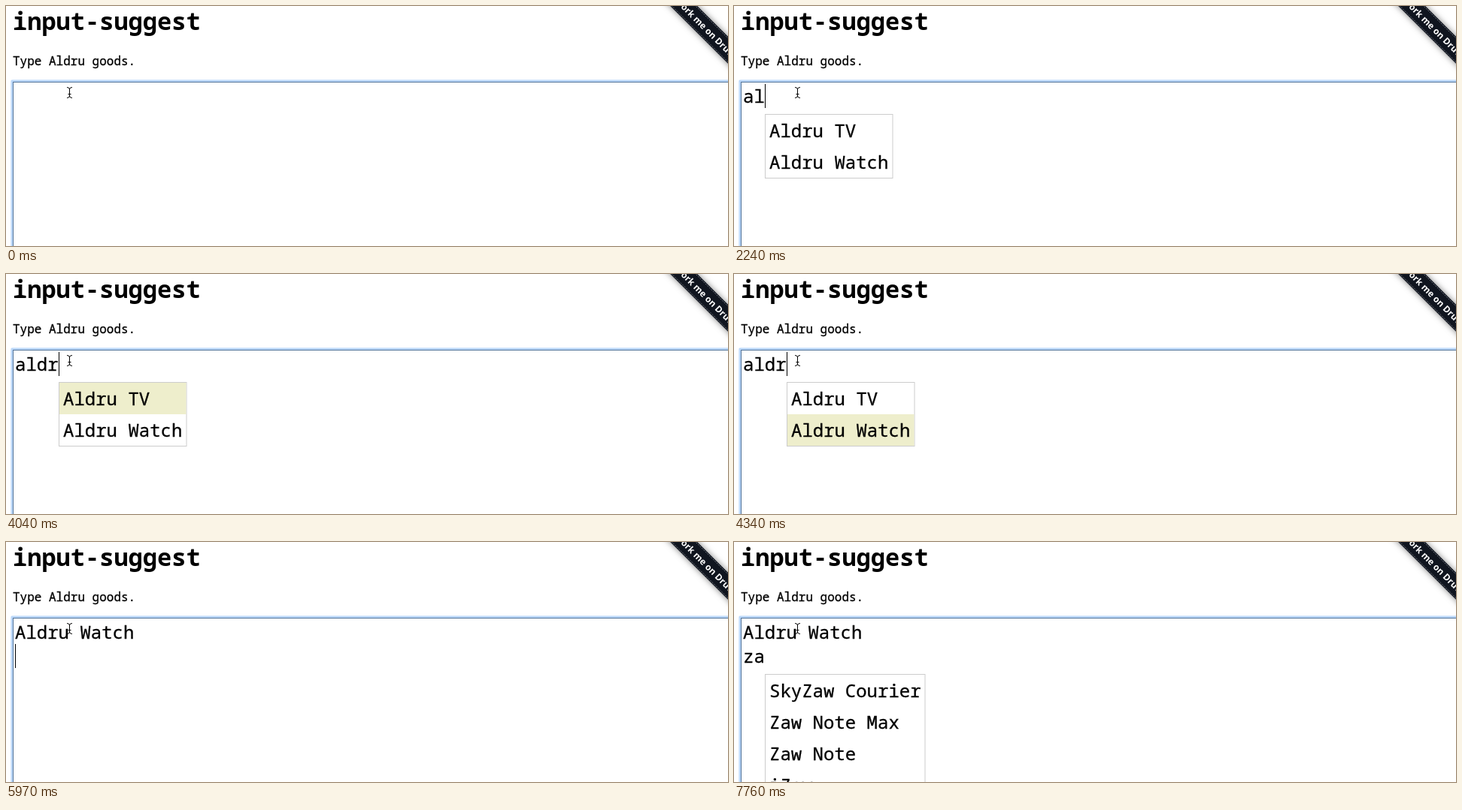
Write an HTML page with a canvas that moves like this. It is 960 by 320 pixels and loops after 8 s.

```html
<!DOCTYPE html>
<html lang="en">
<head>
<meta charset="utf-8">
<title>input-suggest</title>
<style>
  html, body { margin: 0; width: 100%; height: 100%; overflow: hidden; background: #fff; }
  canvas { display: block; }
</style>
</head>
<body>
<canvas id="stage" width="960" height="320"></canvas>
<script>
const ctx = document.getElementById('stage').getContext('2d');
const LOOP = 8000;
const MONO = '"Noto Sans Mono", "DejaVu Sans Mono", monospace';
const CHAR = 14.402, LINE = 32, ROW = 42, ASCENT = 25;
const LEFT = 12.58, TOP = 104;

const GOODS = ['Aldru TV', 'Aldru Watch', 'SkyZaw Courier', 'Zaw Note Max', 'Zaw Note', 'iZaw'];
const matching = query => GOODS.filter(name => name.toLowerCase().includes(query));

// Each step: start time, text, caret shown, suggestion query, highlighted row
const DONE = 'Aldru Watch';
const STEPS = [
  [0, '', false],
  [450, '', true],
  [900, '', false],
  [1490, '', true],
  [1790, 'a', true, 'a'],
  [2240, 'al', true, 'al'],
  [2390, 'ald', true, 'ald'],
  [2840, 'ald', false, 'ald'],
  [2990, 'aldr', true, 'aldr'],
  [3440, 'aldr', false, 'aldr'],
  [3740, 'aldr', false, 'aldr', 0],
  [4040, 'aldr', true, 'aldr', 0],
  [4340, 'aldr', true, 'aldr', 1],
  [4480, 'aldr', false, 'aldr', 1],
  [4930, DONE, true],
  [5380, DONE, false],
  [5970, DONE + '\n', true],
  [6420, DONE + '\n', false],
  [6870, DONE + '\nz', true, 'z'],
  [7310, DONE + '\nza', true, 'za'],
  [7760, DONE + '\nza', false, 'za']
];

function rect(x, y, w, h, color) {
  ctx.fillStyle = color;
  ctx.fillRect(x, y, w, h);
}

// A hairline outline gives the regular weight a little more body
function text(string, x, y, size, weight = 400) {
  ctx.font = `${weight} ${size}px ${MONO}`;
  ctx.fillStyle = ctx.strokeStyle = '#000';
  ctx.fillText(string, x, y);
  if (weight === 400) {
    ctx.lineWidth = 0.3;
    ctx.strokeText(string, x, y);
  }
}

function drawField() {
  ctx.fillStyle = '#d6e7fc';
  ctx.beginPath();
  ctx.roundRect(6, 98, 1000, 300, 3);
  ctx.fill();
  rect(7, 99, 1000, 300, '#bcd8fa');
  rect(9, 101, 1000, 300, '#4f7298');
  rect(10, 102, 1000, 300, '#fff');
}

function drawRibbon() {
  const half = 12.7;
  ctx.save();
  ctx.translate(895.2, -6);
  ctx.rotate(Math.PI / 4);
  ctx.shadowColor = 'rgba(0,0,0,.5)';
  ctx.shadowBlur = 8;
  rect(-60, -half, 240, half * 2, '#10151f');
  ctx.shadowColor = 'transparent';
  ctx.strokeStyle = '#858a93';
  ctx.lineWidth = 0.8;
  ctx.setLineDash([2, 1.5]);
  for (const y of [-half + 1.5, half - 1.5]) {
    ctx.beginPath();
    ctx.moveTo(-60, y);
    ctx.lineTo(180, y);
    ctx.stroke();
  }
  ctx.font = '700 12px "Open Sans", sans-serif';
  ctx.fillStyle = '#fff';
  ctx.fillText('Fork me on Druvik', 0, 4.5);
  ctx.restore();
}

function drawList(left, top, names, picked) {
  const longest = Math.max(...names.map(name => name.length));
  const width = Math.round(2 * (longest * CHAR + 12)) / 2;
  const height = names.length * ROW + 2;
  rect(left, top, width, height, '#ccc');
  rect(left + 1, top + 1, width - 2, height - 2, '#fff');
  names.forEach((name, i) => {
    const y = top + 1 + i * ROW;
    if (i === picked) rect(left + 1, y, width - 2, ROW, '#eeeecc');
    text(name, left + 6, y + 5 + ASCENT, 24);
  });
}

function drawPointer() {
  ctx.strokeStyle = '#000';
  ctx.lineWidth = 1;
  ctx.beginPath();
  ctx.moveTo(81, 108.5);
  ctx.quadraticCurveTo(84.5, 108.5, 84.5, 111);
  ctx.quadraticCurveTo(84.5, 108.5, 88, 108.5);
  ctx.moveTo(84.5, 110);
  ctx.lineTo(84.5, 121);
  ctx.moveTo(81, 122.5);
  ctx.quadraticCurveTo(84.5, 122.5, 84.5, 120);
  ctx.quadraticCurveTo(84.5, 122.5, 88, 122.5);
  ctx.moveTo(82.5, 117.5);
  ctx.lineTo(86.5, 117.5);
  ctx.stroke();
}

function draw(time) {
  const [, value, caret, query, picked] = STEPS.findLast(step => step[0] <= time);
  const lines = value.split('\n');
  const caretX = LEFT + lines.at(-1).length * CHAR;
  const caretY = TOP + (lines.length - 1) * LINE;

  rect(0, 0, 960, 320, '#fff');
  text('input-suggest', 9, 32, 32, 700);
  text('Type Aldru goods.', 9, 79, 16);
  drawField();
  drawRibbon();
  lines.forEach((line, i) => text(line, 12, TOP + i * LINE + ASCENT, 24));
  if (caret) rect(Math.floor(caretX), caretY, 1, LINE, '#000');
  // The list snaps to half pixels, the caret to whole ones
  if (query) drawList(Math.floor(caretX * 2) / 2, caretY + 40, matching(query), picked);
  drawPointer();
}

const start = performance.now();
function tick() {
  draw((performance.now() - start) % LOOP);
  requestAnimationFrame(tick);
}
tick();
</script>
</body>
</html>
```
